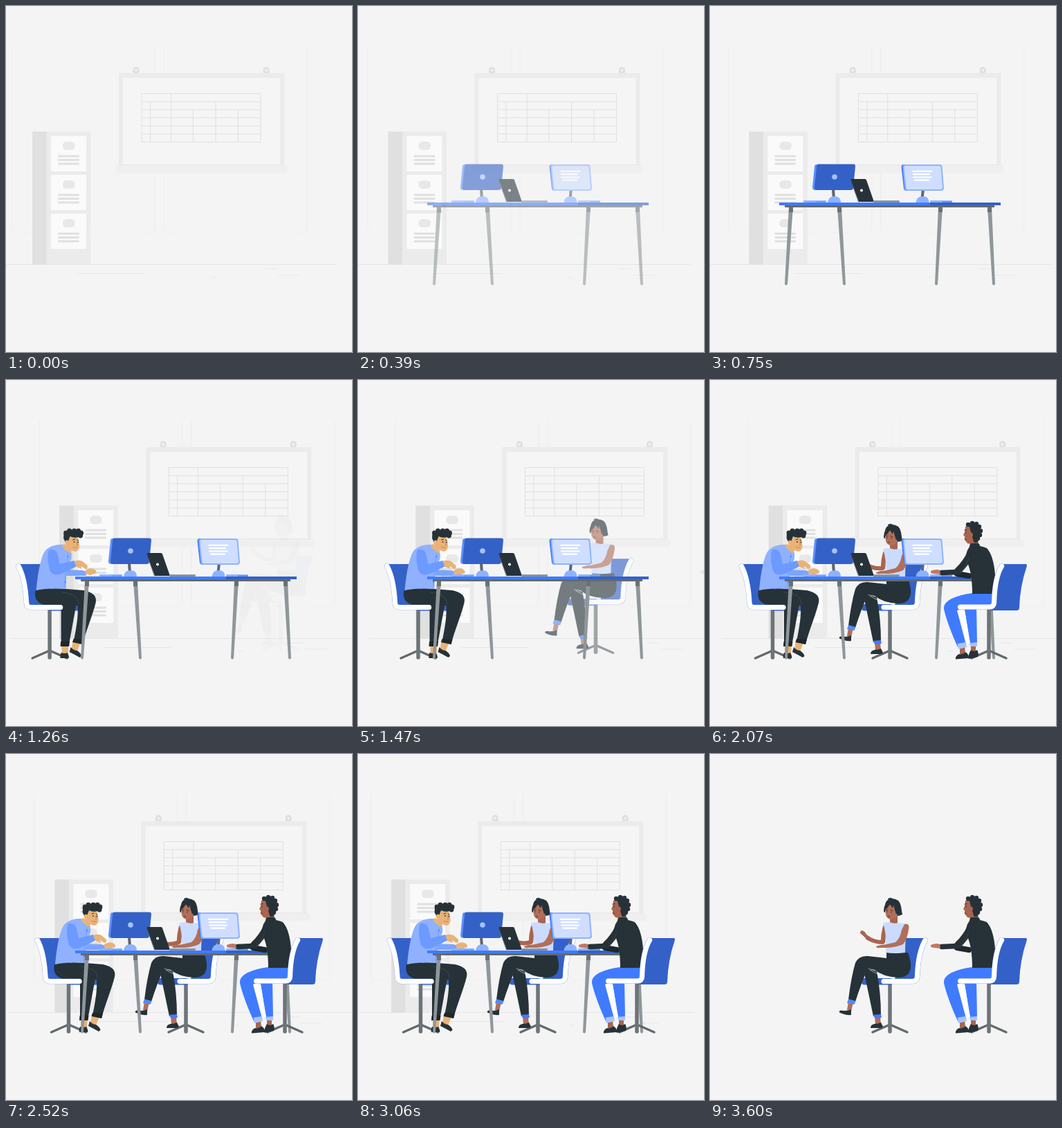
Animation, 500 px wide and 500 px high, one loop 3630 ms. Source, as an HTML page with a canvas:

```html
<!DOCTYPE html>
<html lang="en">
<head>
<meta charset="utf-8">
<title>Team at work</title>
<style>
  html, body { margin: 0; width: 100%; height: 100%; overflow: hidden; background: #f4f4f4; }
  canvas { display: block; width: 500px; height: 500px; }
</style>
</head>
<body>
<canvas id="stage" width="500" height="500"></canvas>
<script>
const LOOP = 3630, STEP = 30, LAST = 3600;
const PAPER = '#f4f4f4', INK = '#263238', BLUE = '#407bff', NAVY = '#3461c8', SKY = '#8fb1ff',
      PALE = '#cbdbff', STEEL = '#8f979a', POLE = '#6c7477',
      TAN = '#e9b278', BROWN = '#b16f59', UMBER = '#a8654f';

const stage = document.getElementById('stage').getContext('2d');
const layerCanvas = document.createElement('canvas');
layerCanvas.width = layerCanvas.height = 500;
const layer = layerCanvas.getContext('2d');
let pen = stage;

const clamp = v => Math.max(0, Math.min(1, v));

function fill(color, d) {
  pen.fillStyle = color;
  pen.fill(new Path2D(d));
}

function line(color, width, d, cap = 'round') {
  pen.strokeStyle = color;
  pen.lineWidth = width;
  pen.lineCap = cap;
  pen.lineJoin = 'round';
  pen.stroke(new Path2D(d));
}

function box(color, x, y, w, h, r = 0) {
  pen.fillStyle = color;
  pen.beginPath();
  pen.roundRect(x, y, w, h, r);
  pen.fill();
}

function dot(color, x, y, rx, ry = rx) {
  pen.fillStyle = color;
  pen.beginPath();
  pen.ellipse(x, y, rx, ry, 0, 0, Math.PI * 2);
  pen.fill();
}

// Draws a group as one flattened picture, so overlaps fade together.
function group(draw, alpha = 1, dx = 0, dy = 0) {
  if (alpha <= 0) return;
  layer.setTransform(1, 0, 0, 1, 0, 0);
  layer.clearRect(0, 0, 500, 500);
  layer.translate(dx, dy);
  pen = layer;
  draw();
  pen = stage;
  stage.globalAlpha = alpha;
  stage.drawImage(layerCanvas, 0, 0);
  stage.globalAlpha = 1;
}

function room() {
  for (const x of [8.5, 228.5])
    line('#e9e9e9', 0.6, `M${x} 58V321q0 6 6 6h195q6 0 6-6V58`, 'butt');
  line('#e1e1e1', 0.8, 'M-30 373.5H476', 'butt');
  line('#e3e3e3', 0.8, 'M104 386.5H200M296 392H304M372 380H391M393 389H424', 'butt');

  for (const x of [188, 376]) {
    box('#e0e0e0', x - 4.5, 88, 9, 11, 4.5);
    dot(PAPER, x, 93, 1.8);
  }
  box('#ebebeb', 163, 97, 239, 134);
  box('#f5f5f5', 169, 104, 227, 125);
  box('#efefef', 158.5, 230, 248, 11);
  line('#e6e6e6', 0.8, 'M163 229.8H402', 'butt');

  line('#e0e0e0', 1, 'M196.5 126.5H368V196.5H196.5Z');
  for (let i = 1; i < 6; i++)
    line('#e0e0e0', 1, `M196.5 ${126.5 + i * 11.67}H368`, 'butt');
  line('#e0e0e0', 1, 'M238.5 126.5V196.5M208.5 138.2V196.5M303 138.2V196.5M270.5 149.8V196.5M335.5 149.8V196.5', 'butt');

  box('#e0e0e0', 38, 181.5, 21, 192);
  box('#ebebeb', 58.5, 181.5, 64, 192);
  for (const y of [188, 244, 300]) {
    box('#fafafa', 65, y, 51, 51);
    box('#e8e8e8', 82, y + 8, 17.5, 12, 5.5);
    for (let i = 0; i < 3; i++) box('#e0e0e0', 75, y + 27.6 + i * 5.5, 31, 2.8, 1.4);
  }
}

function monitorStand(x, lean) {
  line('#5d676b', 4, `M${x - lean} 264L${x} 279`, 'butt');
  fill(SKY, `M${x - 9} 284q1-9 10-9t9 9Z`);
}

function desk() {
  const legs = [[117, 110], [187, 194], [333, 327], [404, 410]];
  for (const [top, foot] of legs) {
    fill(STEEL, `M${top - 3} 290h6L${foot + 2} 402q-2 3-4 0Z`);
    box('#697175', top - 3, 290, 6, 8);
  }
  box('#626b6f', 108, 287, 303, 4);
  box(BLUE, 100, 284, 320, 4);
  box(NAVY, 318, 284, 102, 4);

  monitorStand(179, 1);
  fill('#5d90ff', 'M154 229H200L198 266H152q-4 0-4-4l3-30q0-3 3-3Z');
  fill(NAVY, 'M157 228.5H207q3 0 3 3L207 263q0 3-4 3H155q-4 0-4-4l3-30q0-3.500 3-3.500Z');
  dot('#a6c2ff', 180, 247, 3.8);

  box(SKY, 135, 281, 33, 3, 1);
  box('#79a3ff', 153, 282, 15, 2, 1);

  fill(INK, 'M204 250H224q1.500 0 2 1.500L237 283H215L203 251Z');
  line('#56636a', 0.8, 'M203 250.500L214.500 283');
  box('#8b9396', 236, 281, 38, 3, 1);
  dot('#fff', 219, 266.5, 2);

  monitorStand(306.5, -1.5);
  fill(BLUE, 'M280 229H330L328 267H284q-3 0-4-3L276.500 233q0-4 3.500-4Z');
  fill('#8fb3ff', 'M282 229H332q3 0 3.500 3L338 263q0 4-4 4H285q-3 0-3.500-3L278.500 233q0-4 3.500-4Z');
  fill('#cfdefe', 'M283 231H331q2 0 2.500 2L336 262q0 3-3 3H286q-2 0-2.500-2L280.500 234q0-3 2.500-3Z');
  line('#fff', 2.2, 'M293 238.800H320.500M294 243.200H317M294 247.500H319.500M296 251.700H316');
  box(SKY, 318, 281, 32, 3, 1);
  box('#6996fb', 335, 282, 15, 2, 1);
}

function chairPole(x) {
  line('#62696c', 3.4, `M${x} 391L${x - 25} 402M${x} 391L${x + 25} 402`);
  line(POLE, 5.5, `M${x} 332V401`);
}

// White shell edge with a thin blue outline.
function chairRim(d) {
  line('#6f93ea', 7.6, d);
  line('#fff', 7, d);
}

function curls(list, r) {
  for (const [x, y] of list) dot(INK, x, y, r);
}

function leftMan() {
  chairPole(90.5);
  fill(NAVY, 'M47 266H92V331H59Q59 290 47 266Z');
  box(NAVY, 90, 324, 50, 9.5, 4);

  fill(TAN, 'M108 378H118L117 396H108ZM124 376L135 380L130 392L122 390Z');
  fill(INK, 'M107 394Q112 396 116 394Q119 399 118 402H106Q105 398 107 394Z');
  fill(INK, 'M121 386Q125 391 130 391Q136 395 136.500 399L134 401Q127 397 119 393Z');
  fill(INK, 'M107 314H131Q125 345 119 379H107Z');
  fill('#1d272c', 'M106.500 378H119.500L118.500 385H106Z');
  fill(INK, 'M70 304Q90 300 115 302L140 304Q160 308 157 322C152 342 143 362 138 382L125 378C129 358 132 342 131 326H86Q66 322 70 304Z');
  fill('#1d272c', 'M125 374L140 375L138 382L123.500 379Z');
  line('#46535a', 0.7, 'M108 307Q133 309 132 324');

  fill('#7da5ff', 'M113 274L138 275L144 277L143 283H108Z');
  fill(TAN, 'M142 275Q148 271 154 273Q159 275 158 279L149 282L142 280Z');
  fill(SKY, 'M94 240Q106 236 115 239Q124 246 122 258L115 276L114 302Q90 300 71 304Q74 270 81 252Q85 243 94 240Z');
  fill(TAN, 'M111 237L123 242L121 250Q113 248 108 239Z');
  line('#6f9bff', 1, 'M117 252Q113 276 112 299');
  for (const [x, y] of [[117, 255], [115, 268], [113, 292]]) dot(BLUE, x, y, 1);

  fill(TAN, 'M114 225Q123 220 131 226L133.500 238Q134 246 128 248Q118 246 114 236Z');
  fill(INK, 'M111 222Q116 214 126 217Q136 214 139 222Q138 229 132 227Q126 229 120 226Q118 230 117 235L113 234Q110 228 111 222Z');
  curls([[114, 221], [119, 218], [126, 218], [132, 218], [136, 221], [135, 225], [114, 228]], 3.4);
  dot(TAN, 115.500, 235, 2.6, 3.4);
  line(INK, 1, 'M124 231L127 230M130 231L132 232');
  dot(INK, 126, 234, 0.9);
  dot(INK, 131.500, 234.500, 0.9);
  line('#b97d4d', 0.8, 'M129 234L131 238L129 239M124 241Q127 244 130 242');

  fill('#6c9aff', 'M89 246Q98 242 102 252L105 266L126 261L130 269L110 279Q96 285 91 276Q86 258 89 246Z');
  fill(TAN, 'M126 262Q132 259 138 262L145 268Q146 273 142 273L136 269L137 273L129 270Z');

  chairRim('M45.500 269C53 283 56 303 57 322Q57 328 63 328.500H106');
}

function womanFarArm(lower) {
  pen.save();
  pen.translate(250, 272);
  pen.rotate(-0.38 * lower);
  pen.translate(-250, -272);
  line(UMBER, 6, 'M249 272Q238 272 228 266');
  line(UMBER, 4.5, 'M228 266L222 260');
  fill(UMBER, 'M229 267Q224 266 221 262L217 259Q217 255 220 255Q225 257 226 261L231 264Z');
  pen.restore();
  line(UMBER, 6.5, 'M253 250Q250 261 250 271');
}

function woman(lower) {
  chairPole(260);
  fill(NAVY, 'M281 266H311Q300 286 299 330H266Z');
  box(NAVY, 219, 324, 45, 9.5, 4);
  womanFarArm(lower);

  fill(BROWN, 'M200 358L207 359L204 372L198 370ZM238 379H246L247 391H239Z');
  fill(INK, 'M204 369L204 377Q196 378 187 373.500Q186 370.500 190 370.500Q198 372 204 369Z');
  fill(INK, 'M247 388L250 394L248 396H232Q232 391 238 390Q243 390 247 388Z');
  fill(INK, 'M221 308Q229 345 236 379L247 378Q247 345 241 314Z');
  fill(BLUE, 'M236 377L247 376L248 381L238 382Z');
  fill(INK, 'M255 287H286Q291 300 290 309Q288 323 272 323Q250 322 238 312L228 310Q219 330 210 358L200 355Q204 322 210 302Q215 291 228 292L255 295Z');
  line('#dfe4e6', 0.7, 'M231 312Q240 318 250 320');
  fill('#5288ff', 'M200 354L210.500 357L208.500 362L198 360Z');

  fill(UMBER, 'M260 232L271 233V245Q265 248 260 244Z');
  fill(PALE, 'M250 244Q255 243 260 243Q266 246 272 244L287 245.500Q282 260 282 287Q268 289 254 287Q256 262 250 244Z');
  fill(INK, 'M253 222Q252 210 263 209Q274 209 276 220Q277 227 278 232Q273 235 267 233Z');
  line(INK, 1.8, 'M265 211Q262 207.500 258 209.500');
  fill(BROWN, 'M253.500 219Q262 215 268 221L271 232Q268 239 261 239Q254 238 253.500 229Z');
  fill(INK, 'M251 228Q251 213 263 211.500Q272 213 272 233L268.500 230L265 218L264 223L260 217L256 223Q253 224 253 229Z');
  line('#4b2c26', 0.9, 'M254.500 225.500H257M261 225.500L264 226.500M257 234.500L260 235');
  dot(INK, 256, 228, 0.8);
  dot(INK, 262, 228.500, 0.8);
  dot('#5d90ff', 269.500, 233, 0.9);

  fill(BROWN, 'M281 246Q288 245 287.500 251Q285 269 279 275Q268 280 252 280L251 276L268 272Q275 266 277 254Z');
  fill(BROWN, 'M254 275.500Q246 275 240 278Q240 281 246 280L254 280Z');
  chairRim('M311 269C303 283 300 303 299.500 322Q299 328 293 328.500H251');
}

function rightMan() {
  chairPole(403);
  fill(UMBER, 'M361 384H368L369 396H361ZM377 382H384V393H377Z');
  fill(INK, 'M377 390Q381 394 386 390Q389 396 387 400L374 403Q372 399 377 390Z');
  fill(INK, 'M369 393Q375 397 374 402L355 403.500Q354 399 360 396Q366 397 369 393Z');
  fill(BLUE, 'M367 326H385L386 382L376 383Z');
  fill('#a8c3ff', 'M375.500 380L386 379V385H376Z');
  fill('#fff', 'M357 333H368L376 380H370Z');
  fill(BLUE, 'M379 308H412L410 326Q380 322 357 333L370 382L358 386Q343 353 338 331Q337 322 349 316Q362 310 379 308Z');
  fill('#a8c3ff', 'M357.500 381L369.500 379L371 386L359 389Z');

  line('#1d272c', 8, 'M374 283L357 280');
  fill(NAVY, 'M424 266H456Q459 266 457.500 270Q448 298 447 329Q447 333 443 333H404L410 324Q411 287 424 266Z');
  fill(INK, 'M375 241Q387 237 400 243Q410 254 412 282V309H379Q379 280 372 264Q367 251 375 241Z');
  line(INK, 10, 'M377 250Q369 266 358 276');
  line(INK, 7.5, 'M357 277.500L335 278.500');
  fill('#c4785f', 'M332 274.500L333 281L324 280Q318 280 319 276Q325 273 332 274.500Z');
  line('#455158', 0.6, 'M374 257Q370 270 361 280');

  fill(UMBER, 'M374 228H387L388 238H376Z');
  fill(INK, 'M376 236H388Q391 239 390 242Q382 243 375 241Z');
  fill(UMBER, 'M369 212Q379 207 385 215L384 232Q379 238 372 236L368 231V226L366 224L368 220Z');
  fill(INK, 'M371 208Q381 203 390 212Q394 222 389 230Q386 236 381 233L378 224L375 212Z');
  curls([[373, 209], [379, 207], [385, 208], [389, 212], [391, 218], [390, 224], [387, 229], [384, 232]], 3.2);
  dot(UMBER, 377.500, 224, 2.4, 3.4);
  line(INK, 0.9, 'M368 217L371 216.500');
  dot(INK, 370, 220.500, 0.8);
  line('#6e3c31', 0.7, 'M368 230L371 230.500');

  chairRim('M421.500 269C413 283 411 303 410.500 322Q410 328 404 328H361.500');
}

// Decelerating slide that settles at the given time.
const slide = (t, end) => Math.pow(0.0273 * Math.max(0, end - t), 1.6);
const appear = (t, end) => clamp((t - end + 800) / 355);

function draw(t) {
  stage.fillStyle = PAPER;
  stage.fillRect(0, 0, 500, 500);
  if (t >= LAST) {
    group(() => woman(0));
    group(rightMan);
    return;
  }

  stage.save();
  stage.translate(24.7 * (1 - Math.cos(2 * Math.PI * t / LAST)), 0);
  room();
  stage.restore();

  const lower = t < 1770 ? 0 : (1 - Math.cos(2 * Math.PI * (t - 1770) / 1830)) / 2;
  group(leftMan, appear(t, 1550), -slide(t, 1550));

  // The woman comes in slightly downhill.
  const away = slide(t, 2052);
  group(() => woman(lower), appear(t, 2052), away, -0.092 * away);
  group(desk, clamp((t - 30) / 620));

  const left = Math.pow(1 - clamp((t - 1441) / 454), 2);
  group(rightMan, 1 - left, 200 * left);
}

const start = performance.now();
function tick() {
  const t = (performance.now() - start) % LOOP;
  draw(Math.floor(t / STEP) * STEP);
  requestAnimationFrame(tick);
}
tick();
</script>
</body>
</html>
```
